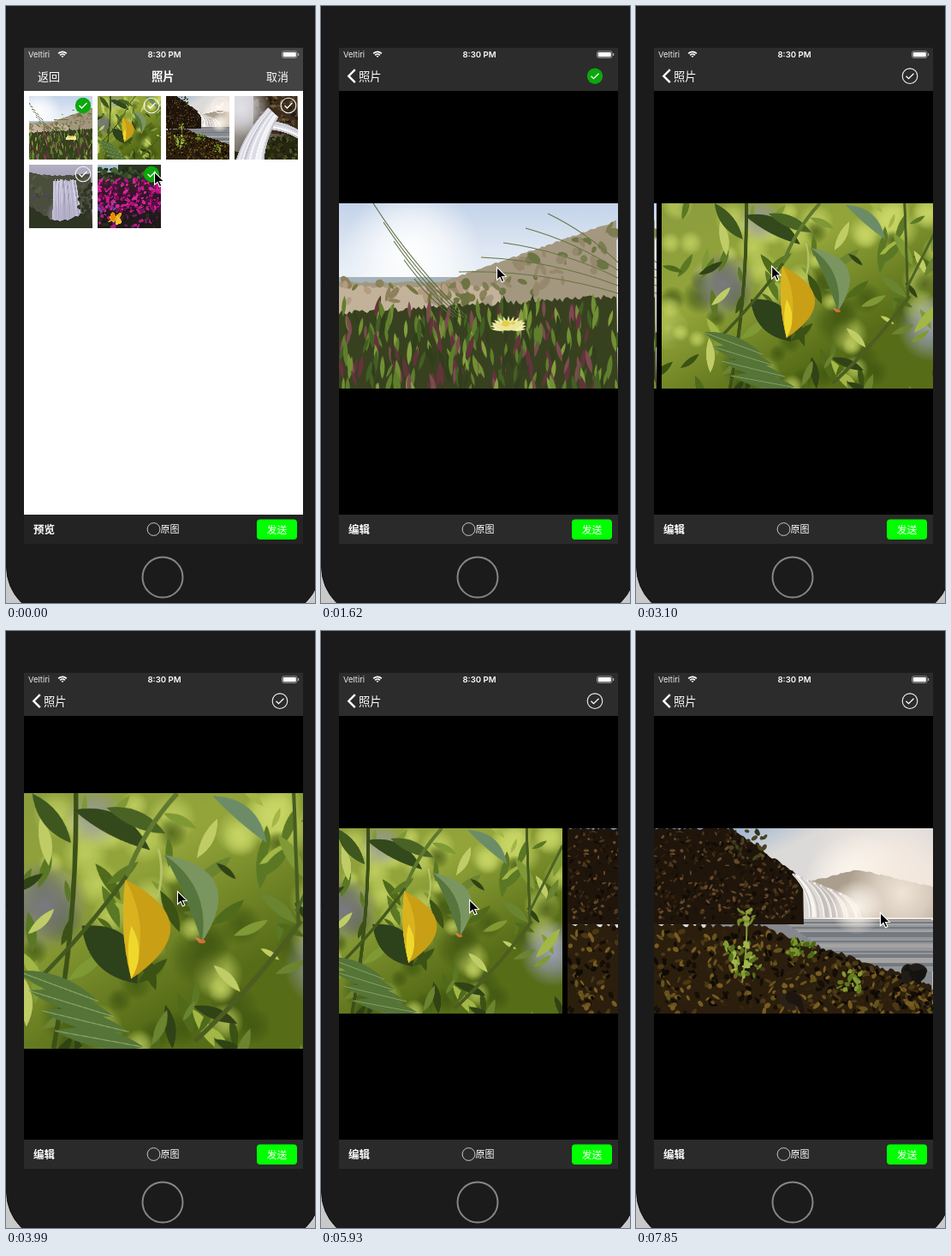
Write an HTML page with a canvas that moves like this. It is 361 by 696 pixels and loops after 8 s.

```html
<!DOCTYPE html>
<html lang="zh">
<head>
<meta charset="utf-8">
<title>Photo picker</title>
<style>
html, body { margin: 0; width: 100%; height: 100%; overflow: hidden; background: #1b1b1b; }
canvas { display: block; width: 361px; height: 696px; }
</style>
</head>
<body>
<canvas id="stage"></canvas>
<script>
const W = 361, H = 696, LOOP = 8000, TICK = 148.2;
const LEFT = 21, TOP = 48.5, BAR = 593;
const PW = 326, PH = 216, PAGE = 332, MID = 338;
const CJK = '"Noto Sans CJK SC", "Noto Sans CJK JP", sans-serif';
const LATIN = 'Inter, Roboto, sans-serif';
const canvas = document.getElementById('stage');
const dpr = window.devicePixelRatio || 1;
canvas.width = W * dpr;
canvas.height = H * dpr;
const ctx = canvas.getContext('2d');

function seeded(seed) {
  return () => {
    seed = (seed * 1664525 + 1013904223) >>> 0;
    return seed / 4294967296;
  };
}

// Drawing helpers for one photo
function brush(c, seed) {
  const rnd = seeded(seed);
  const between = (a, z) => a + rnd() * (z - a);
  const pick = list => list[Math.floor(rnd() * list.length)];
  return {
    between, pick,
    fade(dx, dy, ...colors) {
      const g = c.createLinearGradient(0, 0, dx, dy);
      colors.forEach((s, i) => g.addColorStop(i / (colors.length - 1), s));
      c.fillStyle = g;
      c.fillRect(0, 0, PW, PH);
    },
    glow(x, y, r, rgb, a = 1) {
      const g = c.createRadialGradient(x, y, 0, x, y, r);
      g.addColorStop(0, `rgba(${rgb},${a})`);
      g.addColorStop(0.5, `rgba(${rgb},${a * 0.65})`);
      g.addColorStop(1, `rgba(${rgb},0)`);
      c.fillStyle = g;
      c.fillRect(x - r, y - r, 2 * r, 2 * r);
    },
    // Fill between a rough upper edge and a flat lower one
    land(color, x0, x1, edge, bottom, rough = 0) {
      c.beginPath();
      c.moveTo(x0, bottom);
      for (let x = x0; x <= x1; x += 3) c.lineTo(x, edge(x) + between(-rough, rough));
      c.lineTo(x1, bottom);
      c.fillStyle = color;
      c.fill();
    },
    // Pointed leaf from a to b; k1 and k2 set the bulge on either side
    leaf(color, ax, ay, bx, by, k1, k2) {
      const mx = (ax + bx) / 2, my = (ay + by) / 2, dx = bx - ax, dy = by - ay;
      c.beginPath();
      c.moveTo(ax, ay);
      c.quadraticCurveTo(mx - dy * k1, my + dx * k1, bx, by);
      c.quadraticCurveTo(mx + dy * k2, my - dx * k2, ax, ay);
      c.fillStyle = color;
      c.fill();
    },
    // Stroke from a to b, bent sideways by a share of its length
    line(color, width, ax, ay, bx, by, bend = 0) {
      c.beginPath();
      c.moveTo(ax, ay);
      c.quadraticCurveTo((ax + bx) / 2 - (by - ay) * bend, (ay + by) / 2 + (bx - ax) * bend, bx, by);
      c.strokeStyle = color;
      c.lineWidth = width;
      c.stroke();
    },
    dots(n, x, y, w, h, r, ...colors) {
      for (let i = 0; i < n; i++) {
        c.beginPath();
        c.ellipse(x + rnd() * w, y + rnd() * h, r * between(0.5, 1.5), r * between(0.3, 0.9), rnd() * 3, 0, 7);
        c.fillStyle = pick(colors);
        c.fill();
      }
    }
  };
}

function photo(paint, seed, small) {
  const cv = document.createElement('canvas');
  cv.width = PW * 2;
  cv.height = PH * 2;
  const c = cv.getContext('2d');
  c.scale(2, 2);
  if (small) {
    c.translate((PW - PH) / 2, 0);
    c.scale(PH / 74, PH / 74);
  }
  paint(brush(c, seed));
  return cv;
}

function dunes(b) {
  b.fade(0, 110, '#c3d3e9', '#dfe8f3', '#f4f7fb');
  b.glow(85, 58, 80, '255,255,255');
  b.land('#a4b3ba', 0, PW, () => 86, PH);
  const slope = x => 92 - Math.max(0, x - 120) * 0.35;
  b.land('#a3987f', 0, PW, slope, PH, 1);
  b.land('#c3b29a', 0, 190, () => 97, PH, 2);
  for (let i = 0; i < 90; i++) {
    const x = b.between(100, PW);
    b.dots(1, x, slope(x) + 4, 6, 45, 6, '#7c7d52', '#97876c', '#a59880', '#6c7444');
  }
  b.dots(22, 0, 92, 170, 22, 6, '#8d815c', '#b39c82', '#75753f');
  b.land('#38411f', 0, PW, x => 128 - x * 0.06, PH, 3);
  const tones = ['#5f7f2c', '#83a03f', '#435f24', '#64333c', '#7c4a50', '#303e1b', '#718f34'];
  for (let i = 0; i < 280; i++) {
    const y = 132 + i * 0.36, x = b.between(0, PW);
    b.leaf(b.pick(tones), x, y, x + b.between(-8, 8), y - b.between(16, 30), 0.2, 0.2);
  }
  for (let i = 0; i < 5; i++) {
    b.line('#58683c', 1, 40 + i * 12, i * 22, 150 - i * 4, 133, 0.06);
    b.line('#66743f', 1, 140 + i * 26, 80 - i * 17, PW, 105 - i * 9, -0.08);
  }
  for (let i = 0; i < 13; i++) {
    const a = Math.PI * (0.9 + i * 0.1);
    b.leaf('#f2edb0', 198, 147, 198 + Math.cos(a) * 21, 143 + Math.sin(a) * 12, 0.2, 0.2);
  }
  b.leaf('#ece69a', 179, 141, 217, 139, 0.45, 0.15);
  b.dots(6, 192, 138, 12, 5, 3, '#e5ce45');
}

function leaves(b) {
  b.fade(120, 217, '#8b9c3e', '#93a53a', '#566c17');
  for (let i = 0; i < 70; i++) {
    const x = b.between(0, PW), y = b.between(0, PH);
    const lit = b.between(0, 1) > 0.15 + y / PH * 0.7;
    b.glow(x, y, b.between(10, 26), lit ? '205,219,105' : '62,84,16', 0.75);
  }
  b.glow(72, 95, 40, '122,122,130');
  b.glow(115, 20, 26, '150,152,158', 0.9);
  b.glow(315, 145, 40, '155,160,178');
  // Blurred foliage, darker towards the bottom
  const light = ['#a3b746', '#7f9a35', '#c0cd66', '#5b7824'], dark = ['#4f6a1a', '#3b5214', '#6b8430', '#2f4316'];
  for (let i = 0; i < 95; i++) {
    const x = b.between(0, PW), y = b.between(-10, PH), size = b.between(18, 44), a = b.between(0.2, 2.8);
    const tones = b.between(0, PH) > y ? light : dark;
    b.leaf(b.pick(tones), x, y, x + Math.cos(a) * size, y + Math.sin(a) * size, 0.2, 0.3);
  }
  b.line('#3c5018', 4, 99, 0, 80, PH, -0.05);
  b.line('#465c20', 3, 284, 0, 288, 112);
  b.line('#4c5d22', 4, 290, 108, 200, 210, -0.05);
  b.line('#4c6525', 3, PW, 20, 286, 100);
  b.leaf('#3d571f', 62, 0, 95, 42, 0.3, 0.25);
  b.leaf('#33491c', 97, 14, 162, 48, 0.12, 0.38);
  b.leaf('#496325', 125, 12, 175, 34, 0.2, 0.3);
  b.leaf('#6c8c68', 215, 2, 261, 42, 0.05, 0.4);
  b.leaf('#2d411b', 104, 112, 151, 161, 0.38, 0.6);
  b.line('#60792f', 4, 185, 0, 142, 70, 0.1);
  b.line('#43591f', 3.5, 142, 70, 67, 158, -0.04);
  b.line('#b5c269', 2, 169, 47, 168, 88, -0.15);
  b.leaf('#7b9560', 174, 52, 206, 126, -0.05, 0.75);
  b.leaf('#56763e', 174, 52, 206, 126, -0.05, 0.32);
  b.dots(3, 202, 122, 6, 4, 2.4, '#c98745', '#d46f35');
  b.leaf('#c99f16', 141, 73, 146, 157, 0.1, 0.85);
  b.leaf('#d8b31f', 141, 73, 146, 157, 0.1, 0.24);
  b.leaf('#efd82b', 146, 112, 146, 157, 0.12, 0.3);
  for (let i = 0; i < 4; i++) {
    b.leaf('#557438', 48 + i * 11, 150 + i * 17, 118 + i * 13, 176 + i * 13, 0.18, 0.22);
    b.line('#93aa62', 0.8, 48 + i * 11, 150 + i * 17, 118 + i * 13, 176 + i * 13);
  }
}

function falls(b) {
  b.fade(40, 80, '#6f91c0', '#a0b6d2', '#dcdad8');
  b.glow(270, 65, 95, '249,238,228');
  b.glow(240, 70, 65, '255,248,240');
  b.land('#ab9e8c', 185, PW, x => 48 + Math.abs(x - 240) * 0.24, 104, 1);
  b.glow(290, 75, 65, '244,232,220', 0.95);
  b.land('#85888c', 60, PW, () => 106, PH);
  for (let i = 0; i < 30; i++) b.line(b.pick(['#a5a4a3', '#747a80', '#94969a']), 2, 150 + i * 3, 108 + i * 2, PW, 108 + i * 2);
  const cliff = x => (x < 92 ? 0 : (x - 92) * 0.73);
  b.land('#1f150b', 0, 175, cliff, 112, 2);
  for (let i = 0; i < 430; i++) {
    const x = b.between(0, 165), top = cliff(x) + 3;
    b.dots(1, x, top, 3, 105 - top, 2.4, '#120c06', '#4d361d', '#33230f', '#684a29', '#1a1208');
  }
  b.dots(25, 88, 3, 45, 32, 3, '#484421', '#352f19');
  for (let i = 0; i < 36; i++) {
    const x = 162 + i * 1.7, y = 53 + i * 0.7;
    b.line(b.pick(['#c4bfbb', '#f8f4ef', '#e0dbd6']), 2.2, x, y, x + 20, 104, -0.22);
  }
  b.glow(237, 92, 32, '255,248,240', 0.95);
  const shore = x => 113 + Math.max(0, x - 120) * 0.34;
  b.land('#2b1e0d', 0, PW, shore, PH, 3);
  for (let i = 0; i < 520; i++) {
    const x = b.between(0, PW), top = shore(x) + 4;
    b.dots(1, x, top, 3, PH - top, 3.6, '#150f07', '#4b3814', '#65531c', '#2f220e', '#7a5c20', '#0f0b06');
  }
  b.dots(9, 294, 164, 20, 14, 8, '#201d18', '#151310');
  b.dots(7, 152, 196, 26, 16, 9, '#2b2117', '#1d160f');
  b.line('#8a983b', 2, 103, 180, 108, 96, 0.05);
  b.dots(40, 82, 130, 42, 42, 4, '#809c32', '#a0b74b', '#56721e');
  b.dots(14, 98, 89, 20, 24, 4, '#93a641', '#748a2b');
  b.dots(30, 158, 130, 32, 18, 3.5, '#79972c', '#4c691a');
  b.dots(24, 216, 166, 26, 24, 3.5, '#607b1e', '#849b35');
}

function gorge(b) {
  b.fade(50, 74, '#d6d5da', '#8d8780', '#26210f');
  b.land('#3b2c1c', 22, 74, () => 0, 44);
  b.land('#26270f', 0, 74, x => 66 - x * 0.35, 74, 2);
  b.dots(90, 24, 0, 50, 44, 2.6, '#5c4327', '#231c13', '#44351e', '#6a5c38');
  b.dots(60, 22, 46, 52, 28, 2.6, '#4e5522', '#1d1d10', '#343519');
  b.glow(8, 14, 34, '226,225,231');
  for (let i = 0; i < 22; i++) {
    const tone = b.pick(['#eeeef2', '#dcdce5', '#f7f7fb', '#c5c4cf']);
    b.line(tone, 1.8, 40 + i * 0.5, 14 + i * 0.5, 2 + i * 1.5, 76, 0.12);
    if (i % 3 === 0) b.line(tone, 2, 44, 30 + i * 0.4, 74, 40 + i * 0.4, -0.1);
  }
}

function mist(b) {
  b.fade(0, 74, '#b4b0c4', '#9691a6', '#696674');
  b.land('#4a4f3d', 0, 74, x => 9 + Math.sin(x / 24) * 4, 74, 1);
  b.dots(60, 0, 14, 74, 58, 3, '#3c4230', '#575943', '#4d484d');
  for (let i = 0; i < 34; i++) {
    b.line(b.pick(['#d2cee1', '#a19bb9', '#b9b3cc']), 1.3, 29 + i * 0.75, 17 + b.between(0, 3), 27 + i, 66, -0.03);
  }
  b.glow(43, 60, 24, '177,172,197', 0.9);
  b.land('#2d3422', 0, 74, x => 47 + Math.sin(x / 24) * 18, 74, 1.5);
  b.dots(25, 58, 22, 16, 40, 3, '#36392a', '#2d3422');
}

function blooms(b) {
  b.fade(0, 74, '#2b3920', '#32142a', '#201c17');
  b.land('#a4bed3', 0, 24, () => 0, 9);
  b.dots(60, 0, 5, 74, 15, 3, '#1e2d1a', '#466034', '#354927');
  b.dots(260, 0, 17, 74, 38, 2.4, '#b2107d', '#d12996', '#8c075f', '#c21c88', '#541040');
  b.dots(60, 0, 52, 74, 22, 2.6, '#17191a', '#263018', '#642154', '#b51884');
  b.dots(12, 0, 43, 20, 16, 2, '#7154a5', '#51408b');
  b.dots(12, 14, 58, 12, 10, 3.6, '#f1a514', '#e78b09', '#f5bd31');
}

const photos = [dunes, leaves, falls, gorge, mist, blooms].map((paint, i) => photo(paint, 7 + i * 4, i > 2));

// Motion, counted in ticks
const clamp = k => Math.min(1, Math.max(0, k));
const smooth = k => (k = clamp(k)) * k * (3 - 2 * k);
const ramp = (n, from, to) => smooth((n - from) / (to - from));
const snap = k => (k > 0.99 ? 1 : k);
const push = n => snap(1 - Math.exp(-1.2 * Math.max(0, n - 6)));
const swipe = (n, from) => snap(1 - Math.exp(-((Math.max(0, n - from) * 0.28) ** 2.4)));
const scroll = n => PAGE * (swipe(n, 14.89) + swipe(n, 38.11));
const zoom = n => 1 + ramp(n, 25.75, 28.75) - ramp(n, 32.5, 35.5);

const legs = [
  { from: 0, to: 5, x: 76, y: 150 },
  { from: 6, to: 8, x: 139, y: 190 },
  { from: 8, to: 11, x: 205, y: 304 },
  { from: 15, to: 18, x: 81, y: 302 },
  { from: 18, to: 23, x: 200, y: 303 },
  { from: 33, to: 36, x: 242, y: 313 },
  { from: 38, to: 41, x: 149, y: 313 },
  { from: 41, to: 46, x: 224, y: 308 },
  { from: 46, to: 49, x: 254, y: 481 },
  { from: 50, to: 51, x: 257, y: 518 },
  { from: 51, to: 53, x: 285, y: 328 }
];

function pointer(n) {
  let x = 173, y = 193;
  for (const leg of legs) {
    const k = ramp(n, leg.from, leg.to);
    x += (leg.x - x) * k;
    y += (leg.y - y) * k;
  }
  return [x, y];
}

function text(s, x, y, size, { weight = 400, font = CJK, align = 'left', color = '#fff' } = {}) {
  ctx.font = `${weight} ${size}px ${font}`;
  ctx.textAlign = align;
  ctx.fillStyle = color;
  ctx.fillText(s, x, y);
}

function rect(color, x, y, w, h) {
  ctx.fillStyle = color;
  ctx.fillRect(x, y, w, h);
}

function round(color, x, y, w, h, r) {
  ctx.beginPath();
  ctx.roundRect(x, y, w, h, r);
  ctx.fillStyle = color;
  ctx.fill();
}

function outline(color, width) {
  ctx.strokeStyle = color;
  ctx.lineWidth = width;
  ctx.stroke();
}

function path(color, width, ...p) {
  ctx.beginPath();
  for (let i = 0; i < p.length; i += 2) ctx.lineTo(p[i], p[i + 1]);
  outline(color, width);
}

function ring(x, y, r, color, width) {
  ctx.beginPath();
  ctx.arc(x, y, r, 0, 7);
  outline(color, width);
}

function check(x, y, on) {
  if (on) round('#0ca80c', x - 9.2, y - 9.2, 18.4, 18.4, 9.2);
  else ring(x, y, 8.8, '#f2f2f2', 1.1);
  path('#fff', 1.3, x - 4.5, y, x - 1.5, y + 3, x + 4.5, y - 3);
}

function toolbar(dx, label, color) {
  rect(color, LEFT + dx, BAR, PW, 34);
  text(label, 32 + dx, 614.7, 12.5, { weight: 700 });
  ring(172.5 + dx, 610, 7.4, '#c8c8c8', 1);
  text('原图', 180.5 + dx, 614.2, 11);
  round('#00ff00', 293 + dx, 598.5, 47, 23.5, 4);
  text('发送', 316.5 + dx, 614.6, 11.8, { align: 'center' });
}

function gallery(p) {
  const dx = -98 * p;
  rect('#fff', LEFT + dx, 98, PW, 496);
  photos.forEach((img, i) => {
    const x = 27 + (i % 4) * 80 + dx, y = 105 + Math.floor(i / 4) * 80;
    ctx.drawImage(img, PW - PH, 0, PH * 2, PH * 2, x, y, 74, 74);
    check(x + 63, y + 11, i === 0 || i === 5);
  });
  toolbar(dx, '预览', '#232323');
  rect(`rgba(0,0,0,${0.1 * p})`, LEFT, 98, PW, 529);
}

function preview(dx, n) {
  rect('#000', LEFT + dx, 98, PW, 496);
  const loadedAt = [9, 18, 39];
  loadedAt.forEach((tick, i) => {
    if (n < tick) return;
    const s = i === 1 ? zoom(n) : 1;
    const x = LEFT + i * PAGE - scroll(n) - 201 * (s - 1);
    ctx.drawImage(photos[i], x, MID - PH * s / 2, PW * s, PH * s);
  });
  toolbar(dx, '编辑', '#2a2a2a');
}

function statusBar() {
  text('Veltiri', 26, 60.3, 9.4, { font: LATIN, color: '#eee' });
  text('8:30 PM', 185, 60.3, 9.6, { font: LATIN, weight: 600, align: 'center' });
  for (let i = 0; i < 3; i++) {
    ctx.beginPath();
    ctx.arc(66, 60, 1.2 + i * 2.7, -Math.PI * 0.76, -Math.PI * 0.24);
    outline('#fff', 1.8);
  }
  ctx.beginPath();
  ctx.roundRect(322.5, 52.8, 17.5, 7.6, 2);
  outline('#aaa', 0.8);
  round('#fff', 323.7, 54, 15.1, 5.2, 1);
  rect('#aaa', 341, 55, 1.2, 3);
}

function navBar(p, n) {
  const v = Math.round(67 - 23 * p);
  rect(`rgb(${v},${v},${v})`, LEFT, TOP, PW, 50.5);
  if (p > 0 && p < 0.95) rect('rgba(255,255,255,.05)', LEFT, TOP, 53, 50.5);
  statusBar();
  ctx.globalAlpha = 1 - p;
  text('返回', 37, 86.6, 13);
  text('取消', 304, 86.6, 13);
  ctx.globalAlpha = 1;
  text('照片', 170 - 126 * p, 86.7, 13.3, { weight: p ? 400 : 700 });
  if (!p) return;
  ctx.globalAlpha = p;
  path('#fff', 2.4, 39.8, 74.2, 32.3, 81.7, 39.8, 89.2);
  check(320, 81.7, n < 17);
  ctx.globalAlpha = 1;
}

function phone() {
  rect('#c9c9c9', 0, 0, W, H);
  round('#1b1b1b', 0.6, -60, 366.8, 772, 58);
  outline('#0d0d0d', 1);
  ring(183, 666, 23.5, '#858585', 2);
}

function arrow(x, y) {
  ctx.save();
  ctx.translate(x, y);
  ctx.fillStyle = '#000';
  const shape = new Path2D('M.5 .5V15.5L4 12.3 6.4 17.7 8.9 16.6 6.5 11.4 11.2 11.2Z');
  ctx.fill(shape);
  ctx.strokeStyle = '#fff';
  ctx.lineWidth = 1.1;
  ctx.stroke(shape);
  ctx.restore();
}

function draw(t) {
  const n = Math.floor((t + 20) / TICK), p = push(n);
  ctx.setTransform(dpr, 0, 0, dpr, 0, 0);
  phone();
  ctx.save();
  ctx.beginPath();
  ctx.rect(LEFT, TOP, PW, 578.5);
  ctx.clip();
  if (p < 1) gallery(p);
  if (p > 0) preview(PW * (1 - p), n);
  navBar(p, n);
  arrow(...pointer(n));
  ctx.restore();
}

const start = performance.now();
function loop() {
  draw((performance.now() - start) % LOOP);
  requestAnimationFrame(loop);
}
loop();
</script>
</body>
</html>
```
